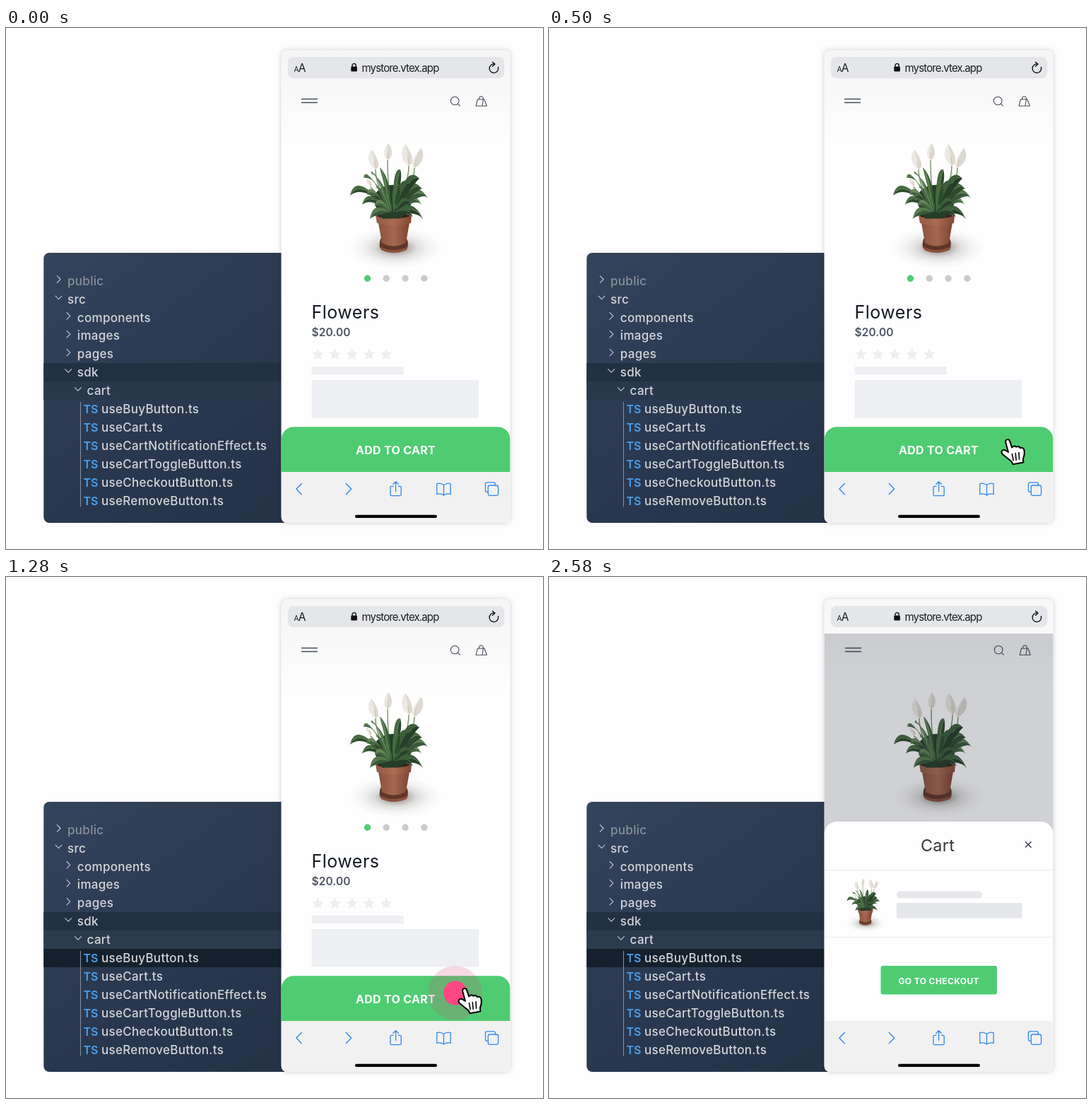
Write an HTML page with a canvas that moves like this. It is 760 by 737 pixels and loops after 3180 ms.

```html
<!DOCTYPE html>
<html lang="en">
<head>
<meta charset="utf-8">
<title>Add to cart</title>
<style>
html, body { margin: 0; width: 100%; height: 100%; overflow: hidden; background: #fefefe; }
canvas { display: block; width: 760px; height: 737px; }
</style>
</head>
<body>
<canvas id="stage"></canvas>
<script>
const W = 760, H = 737, LOOP = 3180;
const SHOW_HAND = 500, PRESS = 1200, RIPPLE = 1280, OPEN_CART = 1680;
const GREEN = '#4fcc72', BLUE = '#2f88ee', INK = '#454b59';
const LEFT = 389.6, WIDE = 324;

const canvas = document.getElementById('stage');
const ctx = canvas.getContext('2d');
const dpr = window.devicePixelRatio || 1;
canvas.width = W * dpr;
canvas.height = H * dpr;

function box(x, y, w, h, fill, r = 0) {
  ctx.beginPath();
  ctx.roundRect(x, y, w, h, r);
  ctx.fillStyle = fill;
  ctx.fill();
}

function disc(x, y, r, fill) {
  ctx.beginPath();
  ctx.arc(x, y, r, 0, Math.PI * 2);
  ctx.fillStyle = fill;
  ctx.fill();
}

function stroke(d, color, width) {
  ctx.strokeStyle = color;
  ctx.lineWidth = width;
  ctx.stroke(new Path2D(d));
}

function shape(d, fill) {
  ctx.fillStyle = fill;
  ctx.fill(new Path2D(d));
}

function text(str, x, y, size, color, { weight = 400, space = 0, align = 'left' } = {}) {
  ctx.font = `${weight} ${size}px Inter, sans-serif`;
  ctx.letterSpacing = space + 'px';
  ctx.textAlign = align;
  ctx.fillStyle = color;
  ctx.fillText(str, x, y);
}

function gradient(x0, y0, x1, y1, ...colors) {
  const g = ctx.createLinearGradient(x0, y0, x1, y1);
  colors.forEach((c, i) => g.addColorStop(i / (colors.length - 1), c));
  return g;
}

/* File tree */
const ROW = 25.9;
const treeFont = { weight: 500, space: 0.3 };
const folders = [
  ['public', 0, false], ['src', 0, true], ['components', 1, false], ['images', 1, false],
  ['pages', 1, false], ['sdk', 1, true], ['cart', 2, true]
];
const files = ['useBuyButton', 'useCart', 'useCartNotificationEffect',
  'useCartToggleButton', 'useCheckoutButton', 'useRemoveButton'];

function drawTree(active) {
  box(53.3, 318, 360, 382, gradient(53, 318, 330, 700, '#33445c', '#2b3a51', '#243348'), 8);
  box(53.3, 474, 340, 26, '#223043');
  box(53.3, 500, 340, 26, active ? '#2b3b50' : '#2a384d');
  if (active) box(53.3, 526, 340, 26, '#14212d');

  folders.forEach(([name, depth, open], i) => {
    const x = 74.5 + depth * 13.7, y = 355.5 + i * ROW;
    const d = open ? `M${x - 4.5} ${y - 2.3}l4.5 4.5l4.5-4.5` : `M${x - 2.2} ${y - 4.8}l4.8 4.8l-4.8 4.8`;
    stroke(d, '#c3c9d1', 1.1);
    text(name, 87 + depth * 13.8, 363.7 + i * ROW, 17, i ? '#d3d5d8' : '#8a9099', treeFont);
  });

  box(105, 529, 1, 148.5, '#8792a0');
  files.forEach((name, i) => {
    const y = 363.7 + (i + folders.length) * ROW;
    text('TS', 109.5, y, 16, '#4a9fee', { weight: 600 });
    text(name + '.ts', 135, y, 17, '#d3d5d8', treeFont);
  });
}

/* Potted plant */
const leafTips = [
  [504, 250], [515, 270], [590, 271], [588, 250], [487, 237], [597, 241], [576, 268],
  [511, 236], [589, 228], [506, 212], [585, 213], [517, 206], [558, 200], [530, 198],
  [572, 220], [524, 226], [556, 222], [538, 236], [572, 248], [522, 252], [553, 254]
];
const greens = [['#2d4a2d', '#446a3e'], ['#38593a', '#557a4b'], ['#263f28', '#3b5f38'], ['#40643c', '#64875a']];
// tip x, tip y, lean, length
const blooms = [[517, 172, 6, 28], [541, 163, -1, 24], [565, 164, 5, 31], [587, 170, -9, 28], [511, 212, 5, 13]];

// An arched leaf that rises from the crown and droops at the tip, lit on one half.
function leaf(x, y, width, [dark, light]) {
  const x0 = 547 + (x - 547) * 0.15, y0 = 260;
  const dx = x - x0, dy = y - y0, lift = Math.abs(dx) * 0.45;
  const ax = x0 + dx * 0.35, ay = y0 + dy * 0.6 - lift * 0.7;
  const bx = x0 + dx * 0.8, by = y0 + dy * 0.85 - lift;
  const nx = width * 0.6 * Math.min(1, Math.abs(dy) / 30), ny = width * 0.7;
  const start = `M${x0} ${y0}C`, mid = `${ax} ${ay} ${bx} ${by} ${x} ${y}`;
  const back = `C${bx} ${by} ${ax} ${ay} ${x0} ${y0}Z`;
  shape(`${start}${ax - nx} ${ay - ny} ${bx - nx} ${by - ny} ${x} ${y}${back}`, light);
  shape(`${start}${ax + nx} ${ay + ny} ${bx + nx} ${by + ny} ${x} ${y}${back}`, dark);
  stroke(start + mid, 'rgba(140,170,120,.3)', 0.6);
}

function drawPlant() {
  ctx.save();
  ctx.translate(551, 311);
  ctx.scale(1, 0.45);
  const shade = ctx.createRadialGradient(0, 0, 6, 0, 0, 66);
  shade.addColorStop(0, 'rgba(60,50,45,.6)');
  shade.addColorStop(0.4, 'rgba(95,90,85,.2)');
  shade.addColorStop(0.7, 'rgba(115,110,105,.07)');
  shade.addColorStop(1, 'rgba(120,120,120,0)');
  disc(0, 0, 66, shade);
  ctx.restore();

  for (const [x, y, lean, len] of blooms) {
    stroke(`M${x + lean} ${y + len}Q${x + lean} 225 546 258`, '#6c8750', 1.3);
  }

  shape('M530 298Q528 306 529 311Q548 322 568 311Q570 303 567 298Z', '#5f3527');
  shape('M526 270L572 270L566 304Q548 313 532 304Z', gradient(526, 0, 572, 0, '#8a513d', '#a4684f', '#7a432f'));
  shape('M529 309Q548 319 569 309L567 314Q548 322 531 314Z', '#8b513b');
  shape('M523 265Q548 259 574 265L573 276Q548 282 525 276Z', gradient(523, 0, 574, 0, '#935944', '#aa6d54', '#7f4733'));
  ctx.beginPath();
  ctx.ellipse(548, 265.5, 23, 4, 0, 0, Math.PI * 2);
  ctx.fillStyle = '#33251c';
  ctx.fill();

  shape('M520 238Q530 222 547 222Q566 222 576 240Q572 258 560 268L533 270Q522 256 520 238Z', '#253e27');
  leafTips.forEach(([x, y], i) => leaf(x, y, 9 + i % 3, greens[i % greens.length]));

  for (const [x, y, lean, len] of blooms) {
    const bx = x + lean, by = y + len, w = len * 0.3;
    shape(`M${x} ${y}C${x - w} ${y + len * 0.4} ${bx - w} ${by - 5} ${bx} ${by}` +
      `C${bx + w} ${by - 4} ${x + w} ${y + len * 0.4} ${x} ${y}Z`, '#ece9e5');
    shape(`M${x} ${y}C${x + w} ${y + len * 0.4} ${bx + w} ${by - 4} ${bx} ${by}Q${bx - 1} ${by - len / 2} ${x} ${y}`, '#dcd8d2');
    stroke(`M${bx} ${by - 3}l${-lean * 0.25} ${-len * 0.3}`, '#d3c8a0', 1.3);
  }
}

/* Phone */
function drawHeaderIcons() {
  stroke('M418.5 100.5h22M418.5 105.5h22', INK, 1.4);
  stroke('M641 103a5.8 5.8 0 1 1-11.6 0a5.8 5.8 0 1 1 11.6 0M639.4 107.2l3 3', INK, 1.1);
  stroke('M667.5 101h9.5l3.4 9.2h-15.2zM669.5 101c0-5.6 6-5.6 6 0M675.5 101l-1.5 9', INK, 1.1);
}

function star(cx, cy, r) {
  ctx.beginPath();
  for (let i = 0; i < 10; i++) {
    const a = (i / 5 - 0.5) * Math.PI, d = i % 2 ? r * 0.45 : r;
    ctx.lineTo(cx + d * Math.cos(a), cy + d * Math.sin(a));
  }
  ctx.closePath();
  ctx.fillStyle = '#eceef1';
  ctx.fill();
}

function drawProduct() {
  for (let i = 0; i < 4; i++) disc(511.5 + i * 26.8, 354.3, 4.7, i ? '#cbcbcb' : GREEN);
  text('Flowers', 432.5, 411, 25, '#131923', { space: 0.5 });
  text('$20.00', 432.5, 436, 15.5, '#4d5564', { weight: 600, space: 0.1 });
  for (let i = 0; i < 5; i++) star(441.3 + i * 24.2, 462, 9);
  box(432.7, 479, 130, 11.3, '#eeeff3');
  box(432.7, 498, 236.5, 53.5, '#eeeff3');
  box(LEFT, 564.2, WIDE, 64, GREEN, [18, 18, 0, 0]);
  text('ADD TO CART', 551.5, 602.6, 16, '#fff', { weight: 700, space: 0.3, align: 'center' });
}

function drawCart() {
  box(LEFT, 80, WIDE, 548, 'rgba(28,33,48,.2)');
  box(LEFT, 346, WIDE, 283, '#fefefe', [18, 18, 0, 0]);
  text('Cart', 550, 387.7, 23.5, '#35373c', { space: 0.2, align: 'center' });
  stroke('M674.5 374.7l7.6 7.6M682.1 374.7l-7.6 7.6', '#33384a', 1.4);
  box(LEFT, 414, WIDE, 1, '#ebebee');
  box(LEFT, 509, WIDE, 1, '#ebebee');
  ctx.save();
  ctx.translate(214.5, 357.5);
  ctx.scale(0.425, 0.425);
  drawPlant();
  ctx.restore();
  box(492, 444.5, 121, 10, '#e6e7eb', 5);
  box(492, 461, 177.5, 21.5, '#e6e7eb', 2);
  box(469.5, 550, 164.5, 40.5, GREEN, 3);
  text('GO TO CHECKOUT', 551.7, 576, 12, '#fff', { weight: 700, space: 0.4, align: 'center' });
}

function drawAddressBar() {
  box(398.8, 41, 306.5, 30, '#e4e6ea', 8);
  text('A', 407.5, 61.5, 10, '#16181c');
  text('A', 413.8, 61.5, 15.5, '#16181c');
  box(488.3, 54.5, 8.6, 7, '#111', 1.2);
  stroke('M490 55v-2a2.6 2.6 0 0 1 5.2 0v2', '#111', 1.4);
  text('mystore.vtex.app', 503.5, 61.5, 15, '#1b1d21', { space: -0.85 });
  stroke('M696.5 55.5a6.3 6.3 0 1 1-5.6-4.6M688.6 48.2l3.4 2.9l-3.4 3.2', '#111', 1.4);
}

function drawToolbar() {
  box(LEFT, 628, WIDE, 72, '#f1f1f1');
  stroke('M418.3 644.5l-7.4 7.6l7.4 7.6M481.3 644.5l7.4 7.6l-7.4 7.6', BLUE, 1.4);
  stroke('M548 648.3h-2.5q-1.5 0-1.5 1.5v10.4q0 1.5 1.5 1.5h12.2q1.5 0 1.5-1.5v-10.4q0-1.5-1.5-1.5h-2.5' +
    'M551.6 655.5v-13.7M547.9 645.3l3.7-3.7l3.7 3.7', BLUE, 1.3);
  stroke('M619.5 646.5q-4.5-3.6-9.7-1.8v14.8q5.2-1.6 9.7 1.5q4.5-3.1 9.7-1.5v-14.8q-5.2-1.8-9.7 1.8v14.3', BLUE, 1.3);
  stroke('M682 656.3h-1.5q-2 0-2-2v-9.5q0-2 2-2h9.8q2 0 2 2v2.2', BLUE, 1.3);
  ctx.beginPath();
  ctx.roundRect(682.3, 647, 14.3, 14.3, 2.5);
  ctx.stroke();
  box(494, 688.8, 116, 4.2, '#000', 2.1);
}

function drawPhone(cartOpen) {
  ctx.save();
  ctx.shadowColor = 'rgba(0,0,0,.2)';
  ctx.shadowBlur = 7 * dpr;
  box(LEFT, 31.5, WIDE, 668.5, '#fefefe', 8);
  ctx.restore();

  ctx.save();
  ctx.beginPath();
  ctx.roundRect(LEFT, 31.5, WIDE, 668.5, 8);
  ctx.clip();
  box(LEFT, 31, WIDE, 670, gradient(0, 31, 0, 165, '#f5f5f5', '#f9f9f9', '#fefefe'));
  ctx.save();
  if (cartOpen) ctx.translate(1, 0);
  drawHeaderIcons();
  drawPlant();
  ctx.restore();
  if (cartOpen) {
    drawCart();
    box(LEFT, 31, WIDE, 49, '#f8f8f8');
  } else {
    drawProduct();
  }
  drawAddressBar();
  drawToolbar();
  ctx.restore();
}

function drawHand() {
  const hand = 'M646.3 586.2C645.3 581.6 650.8 580.4 652.2 584.6L655.2 593.4Q658.5 589.8 661.2 592.6' +
    'Q665 590.6 667 594Q671.5 592.8 672.6 597.5Q673.4 604 671 609L671.4 614.6L656.6 617.2L654.6 613.2' +
    'L641.6 602.7C638.8 599 642.2 595.2 646 597.4L650 600Z';
  shape(hand, '#fff');
  stroke(hand, '#000', 2);
  stroke('M655.4 602.5l1.8 9.2M660.2 601.5l1 9.6M665 600.5l.6 9.6', '#000', 1.6);
}

function draw(t) {
  const cartOpen = t >= OPEN_CART;
  ctx.setTransform(dpr, 0, 0, dpr, 0, 0);
  ctx.lineCap = ctx.lineJoin = 'round';
  box(0, 0, W, H, '#fefefe');
  drawTree(t >= PRESS);
  drawPhone(cartOpen);
  if (t < SHOW_HAND || cartOpen) return;
  if (t >= RIPPLE) disc(635.5, 588.5, 38.3, 'rgba(215,70,125,.2)');
  if (t >= PRESS) disc(636, 588.5, 17, '#ff4785');
  drawHand();
}

const start = performance.now();
function tick() {
  draw((performance.now() - start) % LOOP);
  requestAnimationFrame(tick);
}
tick();
</script>
</body>
</html>
```
